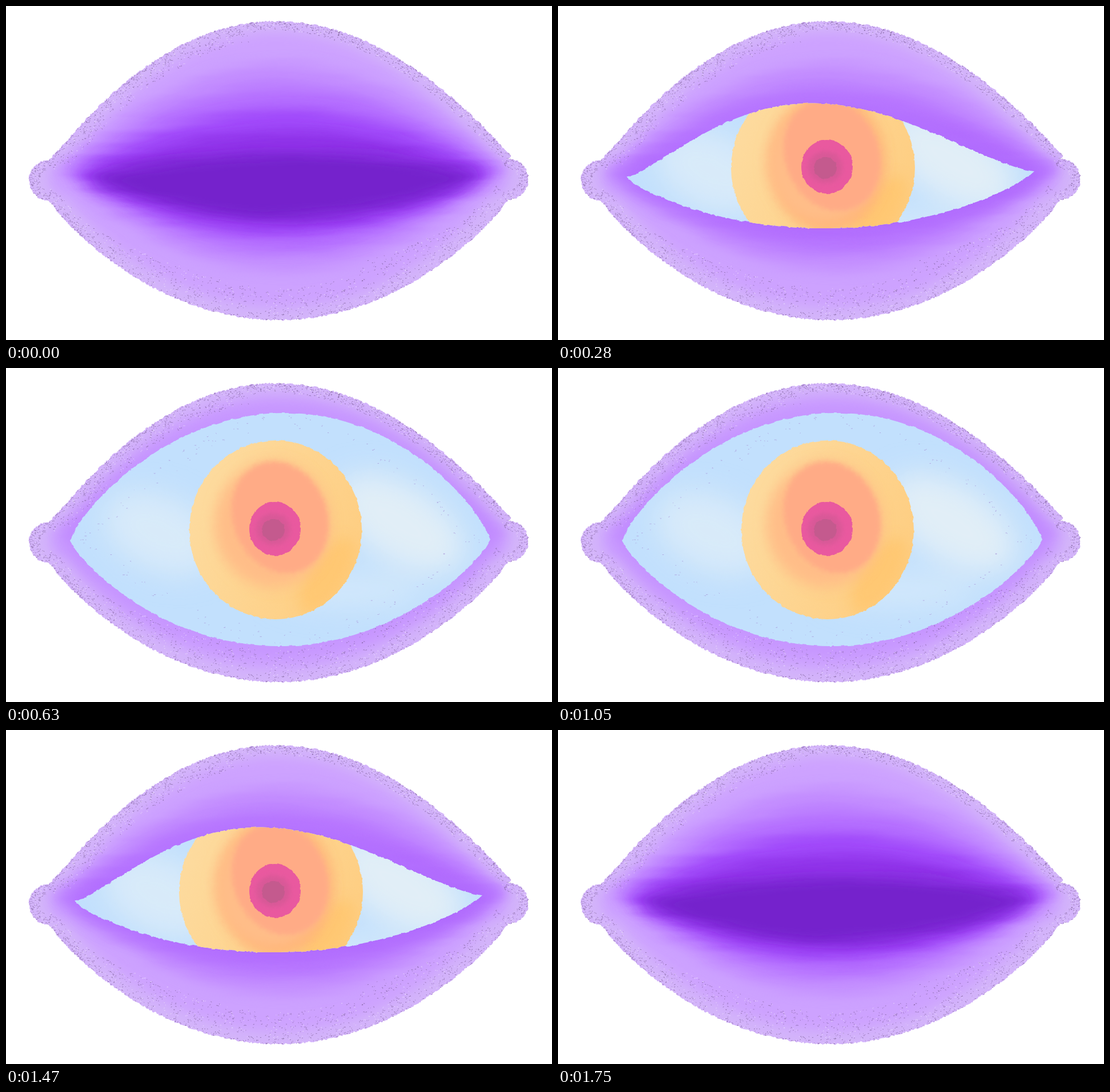
These frames come from a looping animation (956 px wide and 586 px high, 1820 ms). An HTML page:

```html
<!DOCTYPE html>
<html lang="en">
<head>
<meta charset="utf-8">
<title>Blinking eye</title>
<style>
  html, body { margin: 0; width: 100%; height: 100%; overflow: hidden; background: #fff; }
  svg { display: block; width: 100%; height: 100%; }
</style>
</head>
<body>
<svg viewBox="0 0 956 586" xmlns="http://www.w3.org/2000/svg">
  <defs>
    <clipPath id="skinClip"><path class="skin"/></clipPath>
    <clipPath id="lensClip"><path class="lens"/></clipPath>
    <clipPath id="irisClip"><ellipse class="iris" cy="284"/></clipPath>
    <filter id="soft" filterUnits="userSpaceOnUse" x="0" y="0" width="956" height="586"><feGaussianBlur stdDeviation="4"/></filter>
    <filter id="blur" filterUnits="userSpaceOnUse" x="0" y="0" width="956" height="586"><feGaussianBlur stdDeviation="11"/></filter>
    <filter id="haze" filterUnits="userSpaceOnUse" x="0" y="0" width="956" height="586"><feGaussianBlur stdDeviation="25"/></filter>
    <filter id="chalk" filterUnits="userSpaceOnUse" x="0" y="0" width="956" height="586" color-interpolation-filters="sRGB">
      <feTurbulence type="fractalNoise" baseFrequency=".12" numOctaves="2" seed="4"/>
      <feDisplacementMap in="SourceGraphic" scale="4" xChannelSelector="R" yChannelSelector="G"/>
    </filter>
    <filter id="brush" filterUnits="userSpaceOnUse" x="0" y="0" width="956" height="586" color-interpolation-filters="sRGB">
      <feTurbulence type="fractalNoise" baseFrequency=".006 .05" numOctaves="3" seed="9"/>
      <feDisplacementMap in="SourceGraphic" scale="12" xChannelSelector="R" yChannelSelector="G"/>
    </filter>
    <linearGradient id="irisFill" x1="0" y1=".3" x2="1" y2=".75">
      <stop offset="0" stop-color="#fddb9f"/>
      <stop offset="1" stop-color="#fecd80"/>
    </linearGradient>
  </defs>

  <path class="skin" fill="#d3b4fa"/>
  <g clip-path="url(#skinClip)">
    <path class="skin" fill="#cda2ff" filter="url(#blur)" transform="translate(38 22) scale(.92)"/>
    <g id="bands" filter="url(#brush)"></g>
    <path id="glow" class="lens" fill="none" stroke="#b574ff" stroke-width="38" filter="url(#blur)"/>
    <path id="rimDark" fill="none" stroke="#76588f" stroke-opacity=".65"/>
    <path id="rimLight" fill="none" stroke="#f1e6fd" stroke-opacity=".7"/>
  </g>

  <g id="eye" filter="url(#chalk)">
    <g clip-path="url(#lensClip)">
      <rect width="956" height="586" fill="#c2e0fd"/>
      <g filter="url(#haze)">
        <ellipse cx="690" cy="272" rx="125" ry="66" fill="#e1eef7" transform="rotate(32 690 272)"/>
        <ellipse cx="270" cy="290" rx="105" ry="65" fill="#d8eaf9" transform="rotate(25 270 290)"/>
        <ellipse cx="600" cy="390" rx="130" ry="28" fill="#d3e8fb"/>
      </g>
      <path id="flecks" fill="none" stroke="#a795d8" stroke-opacity=".7"/>
      <ellipse class="iris" cy="284" fill="url(#irisFill)"/>
      <g clip-path="url(#irisClip)">
        <ellipse cx="562" cy="365" rx="32" ry="75" fill="#ffc56c" opacity=".7" filter="url(#blur)" transform="rotate(32 562 365)"/>
        <ellipse id="warm" cx="473" cy="275" rx="98" ry="120" fill="#ffad70" filter="url(#blur)"/>
        <ellipse cx="466" cy="274" rx="100" ry="108" fill="#ffbd88" filter="url(#blur)"/>
        <ellipse cx="480" cy="262" rx="82" ry="100" fill="#ffab86" filter="url(#soft)" transform="rotate(-22 480 262)"/>
      </g>
      <ellipse cx="471" cy="282" rx="45" ry="47" fill="#e9599f"/>
      <ellipse cx="468" cy="283" rx="30" ry="28" fill="#d85897" filter="url(#soft)"/>
      <ellipse cx="468" cy="284" rx="20" ry="19" fill="#c45a8e"/>
    </g>
  </g>
</svg>
<script>
const FRAME = 70, FRAMES = 26, RIM = 1000;
const $ = id => document.getElementById(id);
const each = (name, attrs) => document.querySelectorAll('.' + name).forEach(el => {
  for (const key in attrs) el.setAttribute(key, attrs[key]);
});
const clamp = v => Math.max(0, Math.min(1, v));
const mix = (a, b, t) => a + (b - a) * t;
const num = v => v.toFixed(1);
const shape = pts => 'M' + pts.map(p => p.map(num).join(' ')).join('L') + 'Z';

let seed = 20;
function rand() {
  seed = (seed * 1664525 + 1013904223) >>> 0;
  return seed / 4294967296;
}

// Bow from a to b, rising by height; power rounds or sharpens it, skew leans it
function arch(a, b, height, power = 1, skew = 0, steps = 80) {
  return Array.from({ length: steps + 1 }, (_, i) => {
    const u = i / steps, bow = Math.pow(4 * u * (1 - u), power) * (1 + skew * (u - .5));
    return [mix(a[0], b[0], u), mix(a[1], b[1], u) - height * bow];
  });
}
// Half circle, clockwise from the given angle
const lobe = (x, y, r, from) => Array.from({ length: 21 }, (_, i) => {
  const a = from + Math.PI * i / 20;
  return [x + r * Math.cos(a), y + r * Math.sin(a)];
});

// Skin: two bows joined by a lobe in each corner
const outline = document.createElementNS('http://www.w3.org/2000/svg', 'path');
outline.setAttribute('d', shape([
  ...arch([98, 246], [885, 264], 228, 1, -.1),
  ...lobe(879, 304, 36, -Math.PI / 2),
  ...arch([76, 342], [879, 340], -210, .9).reverse(),
  ...lobe(76, 306, 36, Math.PI / 2)
]));
const step = outline.getTotalLength() / RIM;
const rim = Array.from({ length: RIM }, (_, i) => {
  const p = outline.getPointAtLength(i * step);
  return [p.x, p.y];
});
// Point at a depth inside the rim
function inside(i, depth) {
  const a = rim[(i + RIM - 10) % RIM], b = rim[(i + 10) % RIM];
  const dx = b[0] - a[0], dy = b[1] - a[1], k = depth / Math.hypot(dx, dy);
  return [rim[i][0] - dy * k, rim[i][1] + dx * k];
}
each('skin', { d: shape(rim.map((_, i) => inside(i, (rand() - .5) * 3))) });

// Grain is deepest at lower middle, lower right and upper left
function grainDepth([x, y]) {
  if (y > 340) return 22 + 34 * clamp((y - 400) / 110) + (x > 640 ? 14 : 0);
  return x < 420 && y < 260 ? 32 : 18;
}
function grain(count) {
  let d = '';
  for (let k = 0; k < count; k++) {
    const i = Math.floor(rand() * RIM);
    const [x, y] = inside(i, grainDepth(rim[i]) * Math.pow(rand(), 1.6));
    d += `M${num(x)} ${num(y)}l${num(.6 + rand() * 1.8)} ${num((rand() - .5) * 2)}`;
  }
  return d;
}
$('rimDark').setAttribute('d', grain(2500));
$('rimLight').setAttribute('d', grain(900));

// Lid shading: nested bows, darker and flatter inwards
const BANDS = ['#c28cff', '#b56fff', '#a048fa', '#8f32e8', '#7520cc'];
$('bands').innerHTML = BANDS.map((color, k) => {
  const l = [90 + 14 * k, 290 + 3 * k], r = [878 - 12 * k, 288 + 2 * k];
  const d = shape([...arch(l, r, 188 - 37 * k), ...arch(l, r, -175 * Math.pow(.8, k)).reverse()]);
  return `<path d="${d}" fill="${color}" filter="url(#blur)"/>`;
}).join('');
const bands = [...$('bands').children];

// Opening between the lids; a narrow one is pointed and leans left
function lens(o) {
  const shut = 1 - o, d = Math.min(.5, shut);
  const l = [112 + 14 * shut, 303 - 6 * shut], r = [848 - 28 * shut, 301 - 22 * shut];
  return shape([
    ...arch(l, r, o * (269 - 46 * o), .8 + 2.4 * d * d, .06 - 2.6 * d * d),
    ...arch(l, r, o * (8 * o - 194), .83).reverse()
  ]);
}

let flecks = '';
for (let i = 0; i < 150; i++) {
  const u = rand(), bow = Math.sin(Math.PI * u), depth = rand() * rand() * 38;
  const y = 302 + (rand() < .5 ? depth - 218 * bow : 182 * bow - depth);
  flecks += `M${num(130 + u * 700)} ${num(y)}h${num(1 + rand() * 2)}`;
}
$('flecks').setAttribute('d', flecks);

function draw(frame) {
  const o = clamp(Math.min(frame, FRAMES - 1 - frame) / 8), open = o === 1;
  each('lens', { d: lens(o) });
  each('iris', open ? { cx: 472, rx: 151, ry: 157 } : { cx: 464, rx: 161, ry: 160 });
  $('eye').style.display = o ? '' : 'none';
  $('glow').style.opacity = o ? 1.1 - .85 * o : 0;
  $('warm').style.opacity = clamp(1.7 - 1.6 * o);
  $('flecks').style.opacity = open ? 1 : 0;
  bands.forEach((el, k) => {
    const gone = .45 + .85 / Math.pow(k + 1, 1.2);
    el.style.opacity = clamp((gone - o) * 2.2);
  });
}

const start = performance.now();
let shown = -1;
function tick() {
  const frame = Math.floor((performance.now() - start) / FRAME) % FRAMES;
  if (frame !== shown) draw(shown = frame);
  requestAnimationFrame(tick);
}
tick();
</script>
</body>
</html>
```
